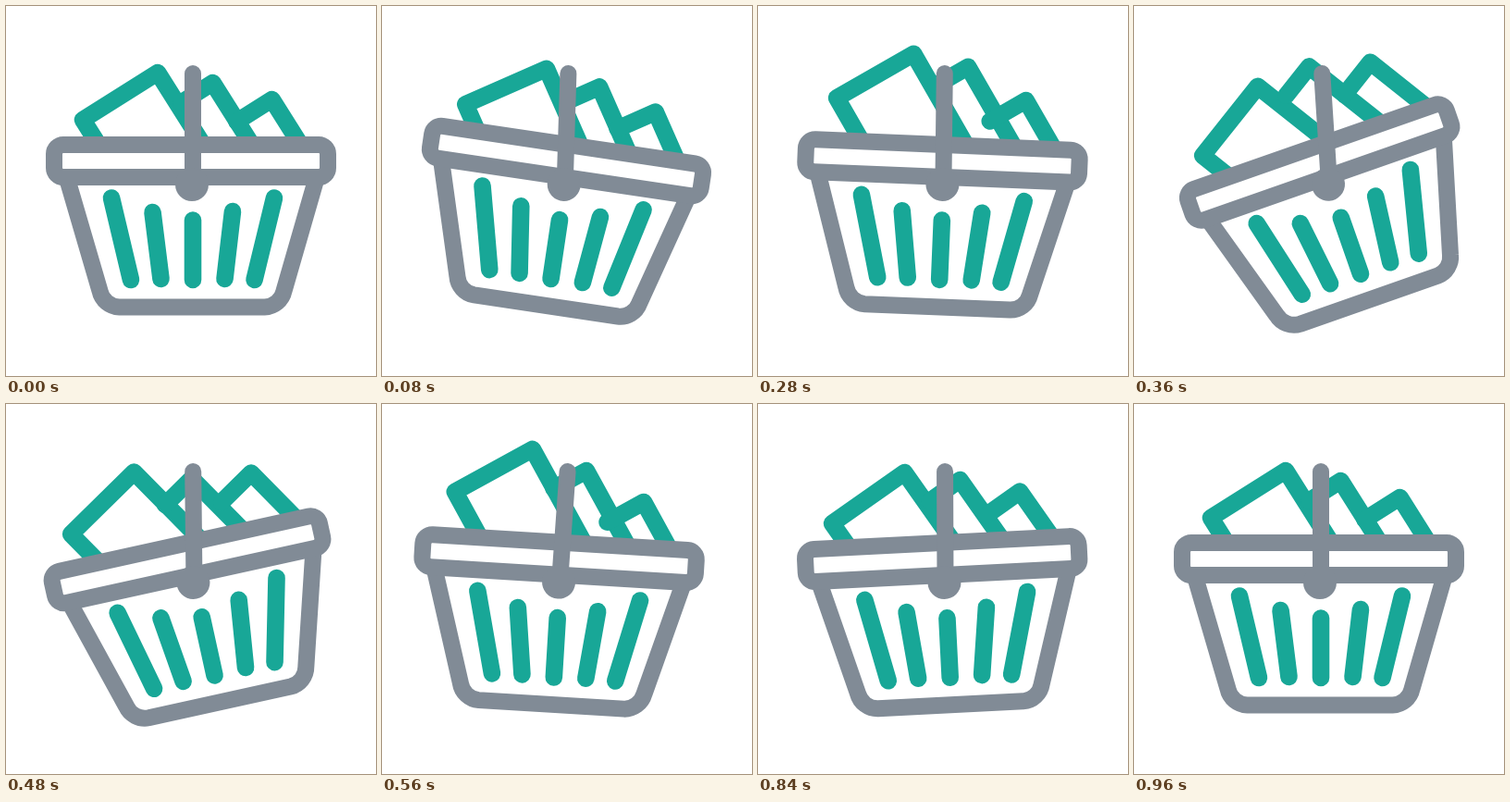
These frames come from a looping animation (400x400 px, 1040 ms). An HTML page:

```html
<!DOCTYPE html>
<html lang="en">
<head>
<meta charset="utf-8">
<title>Swinging basket</title>
<style>
  html, body { margin: 0; width: 100%; height: 100%; overflow: hidden; background: #fff; }
  svg { display: block; width: 100vw; height: 100vh; }
  path, rect, line { fill: none; stroke-width: 18; stroke-linecap: round; stroke-linejoin: round; }
  .teal { stroke: #18a797; stroke-width: 18.6; }
  .gray { stroke: #818b96; }
  circle { fill: #818b96; }
</style>
</head>
<body>
<svg viewBox="0 0 400 400">
  <defs>
    <clipPath id="above"><rect x="-100" y="-100" width="600" height="250"/></clipPath>
  </defs>
  <g id="basket">
    <g clip-path="url(#above)">
      <path class="teal paper" d="M136.300 207.600 L83 123 L164 72 l64 101.500"/>
      <path class="teal paper" d="M189.500 104.500 L223.500 83 l64 101.500"/>
      <path class="teal paper" d="M249.500 125 L287.500 101 l53.300 84.600"/>
    </g>
    <path class="gray" d="M67 190 L101.500 308 A22 22 0 0 0 122.500 325.500 H279.500 A22 22 0 0 0 300.500 308 L334.500 190"/>
    <path class="teal" d="M114 207.500 L135 296 M158.500 223 L167.500 295 M202 231.500 V296 M245 222 L236.500 295 M290 207.500 L268.500 296"/>
    <rect class="gray" x="52" y="150" width="296" height="35" rx="10"/>
  </g>
  <g id="handle">
    <line class="gray" x1="202" y1="73" x2="202" y2="190"/>
    <circle cx="201" cy="193" r="18"/>
  </g>
</svg>
<script>
  const LOOP = 1040, STEP = 40, LAST = 960;
  const PIVOT = '201.5 53', HUB = '201 193';
  const HOP = 314, LIFT = 20.8;

  // Key poses: time in ms, handle angle, basket angle.
  const poses = [
    [0, 0, 0], [200, 5, 24], [360, -3.7, -19.3], [480, -0.6, -12.4],
    [600, 5.3, 8], [680, 3.1, 2], [840, -0.2, -2.9], [960, 0, 0]
  ];

  const basket = document.getElementById('basket');
  const handle = document.getElementById('handle');
  const papers = [...document.querySelectorAll('.paper')];

  // Monotone tangent: flat at peaks and ends, harmonic mean elsewhere.
  function tangent(i, k) {
    if (i === 0 || i === poses.length - 1) return 0;
    const slope = j => (poses[j + 1][k] - poses[j][k]) / (poses[j + 1][0] - poses[j][0]);
    const l = slope(i - 1), r = slope(i);
    return l * r <= 0 ? 0 : 2 * l * r / (l + r);
  }

  function angle(k, t) {
    let i = 0;
    while (i < poses.length - 2 && t >= poses[i + 1][0]) i++;
    const a = poses[i], b = poses[i + 1];
    const h = b[0] - a[0], u = (t - a[0]) / h, w = 1 - u;
    return a[k] * (1 + 2 * u) * w * w + b[k] * u * u * (3 - 2 * u)
      + h * u * w * (tangent(i, k) * w - tangent(i + 1, k) * u);
  }

  // Every paper hops twice, each one a little after its neighbour.
  function hop(i, t) {
    const u = (t - 92 - 58 * i - 9 * i * i) / HOP;
    return u > 0 && u < 2 ? LIFT * Math.sin(Math.PI * u) ** 2 : 0;
  }

  function draw(now) {
    const t = Math.min(LAST, Math.floor((now % LOOP) / STEP) * STEP);
    const swing = angle(1, t), tilt = angle(2, t);
    const hang = `rotate(${swing} ${PIVOT})`;
    handle.setAttribute('transform', hang);
    basket.setAttribute('transform', `${hang} rotate(${tilt - swing} ${HUB})`);
    papers.forEach((paper, i) => paper.setAttribute('transform', `translate(0 ${-hop(i, t)})`));
  }

  const start = performance.now();
  function tick() {
    draw(performance.now() - start);
    requestAnimationFrame(tick);
  }
  tick();
</script>
</body>
</html>
```
